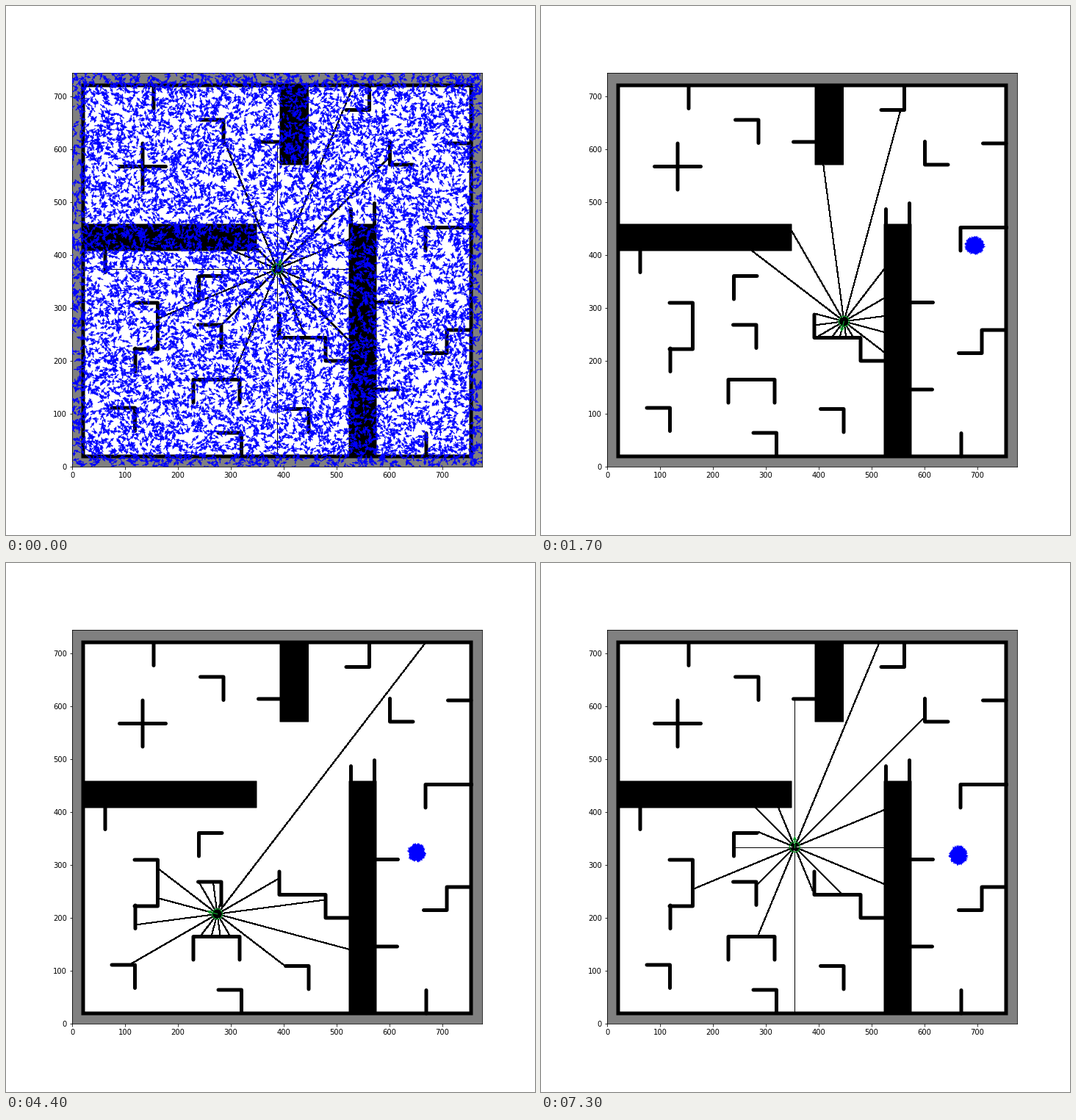
These frames come from a looping animation (720x720 px, 7.4 s). A matplotlib script:

```python
import numpy as np
import matplotlib.pyplot as plt
from matplotlib.animation import FuncAnimation
from matplotlib.collections import LineCollection
from matplotlib.patches import Circle, Polygon, Rectangle

SIZE, DPI = 720, 72
FRAMES, INTERVAL = 74, 100
LEFT, RIGHT, TOP, BOTTOM = 90, 648, 91, 627
UNIT = 0.7195            # pixels per map unit
STEP = 10 * UNIT         # robot travel per frame
ARM, THICK = 31.5, 5     # wall module and wall thickness
GREEN = "#0a9a28"

ROOM = (105, 108, 633, 613)
BLOCKS = [(373, 108, 411.5, 216), (105, 297, 341, 333), (467, 297, 504, 613)]
# Thin walls: a starting point, then one module per letter
WALLS = [
    (201, 108, "D"), (264.5, 155, "RD"), (154.5, 218.5, "RR"), (186, 187, "DD"),
    (343.5, 185, "R"), (494.5, 110, "DL"), (522.5, 184.5, "DR"), (633, 187, "L"),
    (501.5, 300, "U"), (469.5, 308, "U"), (135, 331, "D"), (262.5, 399, "UR"),
    (175, 404, "RDDL"), (176, 466, "D"), (261.5, 434, "RD"), (372, 420, "DRRDR"),
    (502, 403.5, "R"), (501, 522, "R"), (571, 333, "URR"), (568.5, 472.5, "RUR"),
    (144, 547, "RD"), (255, 540, "URRD"), (289, 581, "RD"), (380.5, 548.5, "RD"),
    (572, 613, "U"),
]
MOVES = {"R": (ARM, 0), "L": (-ARM, 0), "U": (0, -ARM), "D": (0, ARM)}

RUNS = [7, 19, 24, 4, 5]  # straight runs, each followed by a right turn
# Key points of the particle cloud
CLOUD_T = [0, 11, 23, 33, 44, 54, 73]
CLOUD_X = [560, 576, 605, 569, 559, 580, 568]
CLOUD_Y = [338, 331, 321, 360, 394, 379, 398]
SWARM, SCATTER = 600, 10000


def trace(x, y, letters):
    return np.cumsum([(x, y)] + [MOVES[c] for c in letters], axis=0)


def wall_grid():
    grid = np.zeros((SIZE, SIZE), bool)

    def fill(x0, y0, x1, y1, pad=0):
        a, b = round(x0 - pad), round(x1 + pad)
        c, d = round(y0 - pad), round(y1 + pad)
        grid[c:d, a:b] = True

    for block in BLOCKS:
        fill(*block)
    for wall in WALLS:
        line = trace(*wall)
        for p, q in zip(line, line[1:]):
            fill(*np.minimum(p, q), *np.maximum(p, q), pad=2)
    x0, y0, x1, y1 = ROOM
    inside = np.zeros_like(grid)
    inside[y0 + 2:y1 - 2, x0 + 2:x1 - 2] = True
    return grid | ~inside


GRID = wall_grid()
REACH = np.arange(0, SIZE, 0.5)


def polar(x, y, r, deg):
    a = np.radians(deg)
    return x + r * np.cos(a), y - r * np.sin(a)


def cast(x, y, deg):
    px, py = polar(x, y, REACH, deg)
    col = np.clip(px, 0, SIZE - 1).astype(int)
    row = np.clip(py, 0, SIZE - 1).astype(int)
    hit = np.argmax(GRID[row, col])
    return px[hit], py[hit]


def drive():
    """Pose of the robot in every frame."""
    poses = [(369.3, 358, 67.5)]
    x, y, heading = 378.6, 360.6, 345
    for run in RUNS:
        poses += [(*polar(x, y, STEP * k, heading), heading) for k in range(run + 1)]
        x, y = poses[-1][:2]
        heading -= 90
    # Set down elsewhere, then straight up
    rest = FRAMES - len(poses)
    poses += [(345.3, 386.5 + STEP * k, 90) for k in reversed(range(rest))]
    return poses


POSES = drive()


def swarm_state(n):
    """Particles gather from a few clusters into a single cloud."""
    rng = np.random.default_rng(100 + n)
    r = 7.5 * np.sqrt(rng.random(SWARM))
    a = rng.uniform(0, 2 * np.pi, SWARM)
    spots = np.column_stack([r * np.cos(a), r * np.sin(a)])
    spots = spots * rng.uniform(0.9, 1.1, 2)
    centres = np.random.default_rng(5).uniform((120, 122), (620, 600), (60, 2))
    centres[0] = np.interp(n, CLOUD_T, CLOUD_X), np.interp(n, CLOUD_T, CLOUD_Y)
    count = max(1, int(60 * 0.58 ** (n - 1)))
    spots += centres[np.arange(SWARM) % count]
    return spots, rng.uniform(0, 2 * np.pi, SWARM)


fig = plt.figure(figsize=(SIZE / DPI, SIZE / DPI), dpi=DPI, facecolor="white")
ax = fig.add_axes([LEFT / SIZE, 1 - BOTTOM / SIZE,
                   (RIGHT - LEFT) / SIZE, (BOTTOM - TOP) / SIZE])
ax.set_xlim(LEFT, RIGHT)
ax.set_ylim(BOTTOM, TOP)
ax.set_facecolor("#808080")
ticks = np.arange(0, 800, 100)
ax.set_xticks(LEFT + UNIT * ticks, ticks)
ax.set_yticks(BOTTOM - UNIT * ticks, ticks)
ax.tick_params(labelsize=10, labelfontfamily="DejaVu Sans")


def box(x0, y0, x1, y1, **style):
    return ax.add_patch(Rectangle((x0, y0), x1 - x0, y1 - y0, snap=False, **style))


x0, y0, x1, y1 = ROOM
half = THICK / 2
outer = box(x0 - half, y0 - half, x1 + half, y1 + half, fc="black", lw=0, zorder=1)
box(x0 + half, y0 + half, x1 - half, y1 - half, fc="white", lw=0, zorder=1)
for block in BLOCKS:
    box(*block, fc="black", ec="black", lw=1, joinstyle="round", zorder=2)
for wall in WALLS:
    line, = ax.plot(*trace(*wall).T, color="black", lw=THICK, zorder=2, snap=False,
                    solid_capstyle="round", solid_joinstyle="round")
    line.set_clip_path(outer)


def arrows(spots, angles, length):
    return ax.quiver(*spots.T, length * np.cos(angles), length * np.sin(angles),
                     color="blue", units="dots", width=1.2, headwidth=3.5,
                     headlength=4, headaxislength=4, scale=1,
                     scale_units="dots", angles="uv", zorder=4)


init = np.random.default_rng(1)
scatter = arrows(init.uniform((LEFT, TOP), (RIGHT, BOTTOM), (SCATTER, 2)),
                 init.uniform(0, 2 * np.pi, SCATTER), 9)
swarm = arrows(*swarm_state(1), 7)

rays = LineCollection([], colors="black", linewidths=1, antialiaseds=False, zorder=3)
ax.add_collection(rays, autolim=False)
body = ax.add_patch(Circle((0, 0), 7, fill=False, ec=GREEN, lw=1.3, zorder=5))
shaft, = ax.plot([], [], color=GREEN, lw=1.3, zorder=5)
head = ax.add_patch(Polygon([(0, 0)] * 3, closed=True, color=GREEN, lw=0, zorder=5))


def draw(n):
    x, y, heading = POSES[n]
    rays.set_segments([[(x, y), cast(x, y, heading + 22.5 * k)] for k in range(16)])
    body.center = x, y
    neck = polar(x, y, 9, heading)
    shaft.set_data([x, neck[0]], [y, neck[1]])
    head.set_xy([polar(x, y, 15, heading),
                 polar(*neck, 3, heading + 90), polar(*neck, 3, heading - 90)])

    scatter.set_visible(n == 0)
    swarm.set_visible(n > 0)
    if n > 0:
        spots, angles = swarm_state(n)
        swarm.set_offsets(spots)
        swarm.set_UVC(7 * np.cos(angles), 7 * np.sin(angles))
    return scatter, swarm, rays, body, shaft, head


anim = FuncAnimation(fig, draw, frames=FRAMES, interval=INTERVAL,
                     repeat=True, repeat_delay=0, blit=False)
plt.show()
```
